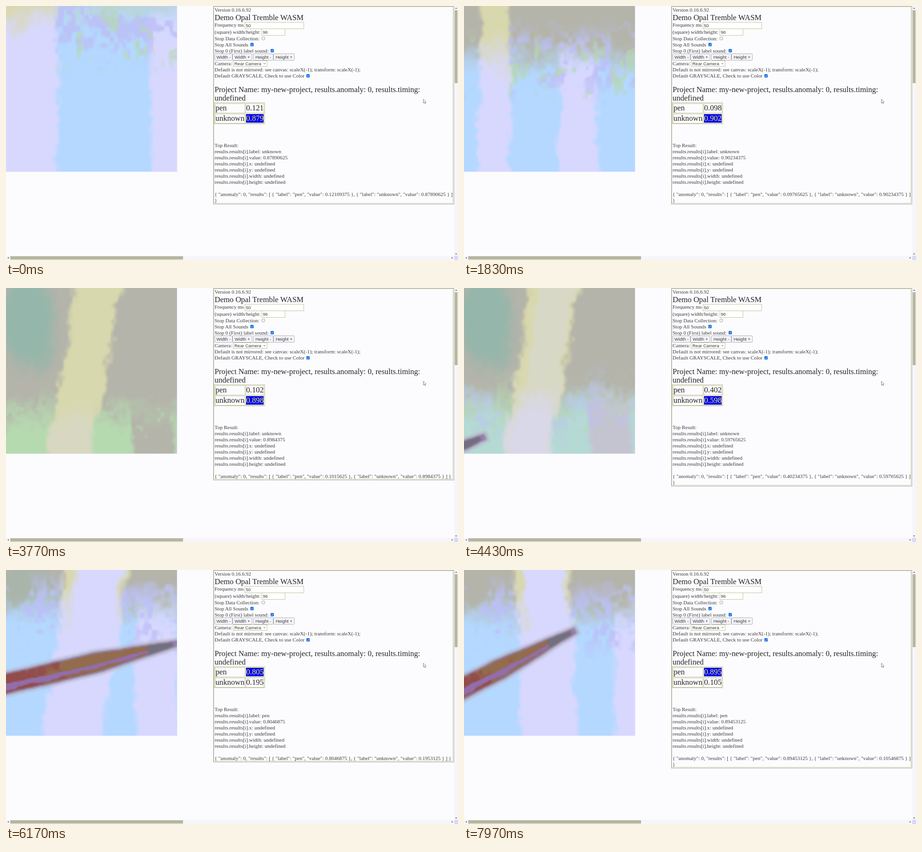
An HTML page with a canvas that plays this animation: 960x540 px, repeating every 8000 ms.

```html
<!DOCTYPE html>
<html lang="en">
<head>
<meta charset="utf-8">
<title>Classifier demo</title>
<style>
  html, body { margin: 0; width: 100%; height: 100%; overflow: hidden; background: #fcfcff; }
  canvas, svg { position: absolute; left: 0; top: 0; }
  canvas { width: 363px; height: 352px; box-shadow: 0 0 0 1px #ececff; }
  text { font-family: "Liberation Serif", "Times New Roman", serif; font-size: 11px; fill: #3c3c3c; white-space: pre; }
  .big { font-size: 16.5px; fill: #242424; }
  .ui { font-family: "Liberation Sans", Arial, sans-serif; font-size: 9.5px; }
  .top { fill: #f4f45c; }
</style>
</head>
<body>
<canvas id="camera" width="121" height="117"></canvas>
<svg id="page" width="960" height="540" viewBox="0 0 960 540"></svg>
<script>
const LOOP = 8000;
const lerp = (a, b, k) => a + (b - a) * k;
const mix = (a, b, k) => a.map((v, i) => lerp(v, b[i], k));
const smooth = (lo, hi, v) => {
  const k = Math.min(1, Math.max(0, (v - lo) / (hi - lo)));
  return k * k * (3 - 2 * k);
};
// Linear interpolation over [time, ...values] key poses.
function sample(keys, t) {
  const i = Math.max(0, keys.findLastIndex(k => k[0] <= t));
  const a = keys[i], b = keys[i + 1] || a;
  return mix(a, b, a === b ? 0 : Math.max(0, (t - a[0]) / (b[0] - a[0]))).slice(1);
}

// ---------- page ----------
const LEFT = 443, LINE = 13;
const OLIVE = '#c4c49c', GREY = '#b4b4b4';
const el = id => document.getElementById(id);
const label = (x, y, str, cls = '', id = '') => `<text x="${x}" y="${y}" class="${cls}" id="${id}">${str}</text>`;
const rect = (x, y, w, h, fill, stroke = 'none', extra = '') =>
  `<rect x="${x}" y="${y}" width="${w}" height="${h}" fill="${fill}" stroke="${stroke}" ${extra}/>`;
const path = (d, fill, stroke = 'none') => `<path d="${d}" fill="${fill}" stroke="${stroke}"/>`;
const lines = (y, rows) => rows.map((str, i) => label(LEFT, y + LINE * i, str)).join('');
const field = (x, y, w, str) => rect(x + .5, y + .5, w, 14, '#fff', OLIVE) + label(x + 2.5, y + 11, str, 'ui');
const checkbox = (x, y, on) => on
  ? rect(x, y, 7, 7, '#1470e4', 'none', 'rx="1"') + path(`M${x + 1.4} ${y + 3.6}l1.5 1.6l2.8 -3.2`, 'none', '#fff')
  : rect(x + .5, y + .5, 6, 6, '#fff', '#a0a0a0', 'rx="1"');
const button = (x, w, str) => rect(x + .5, 101.5, w - 1, 14, '#f4f4f8', '#b0b0bc', 'rx="1"') +
  `<text x="${x + w / 2}" y="112" text-anchor="middle" class="ui">${str}</text>`;

page.innerHTML =
  rect(440.5, .5, 511, 421, 'none', GREY, 'id="outer"') +
  rect(441.5, 1.5, 508, 418, 'none', OLIVE, 'id="inner"') +
  label(LEFT, 12, 'Version 0.16.6.92') +
  label(LEFT, 30, 'Demo Opal Tremble WASM', 'big') +
  label(LEFT, 44, 'Frequency ms') + field(507, 34, 125, '50') +
  label(LEFT, 58.5, '(square) width/height:') + field(543, 48, 49, '96') +
  lines(72.5, ['Stop Data Collection:', 'Stop All Sounds', 'Stop 0 (First) label sound:']) +
  [543, 519, 562].map((x, i) => checkbox(x, 65.5 + LINE * i, i > 0)).join('') +
  button(443, 38, 'Width -') + button(481, 42, 'Width +') + button(525, 43, 'Height -') + button(568, 45, 'Height +') +
  rect(482.5, 116.5, 72, 12, '#fff', OLIVE) + label(485, 126, 'Rear Camera', 'ui') +
  path('M547 121.5l2 2l2 -2', 'none', '#505050') +
  lines(126, ['Camera:', 'Default is not mirrored: see canvas: scaleX(-1); transform: scaleX(-1);',
    'Default GRAYSCALE, Check to use Color']) + checkbox(638, 145, true) +
  label(LEFT, 183, 'Project Name: my-new-project, results.anomaly: 0, results.timing:', 'big') +
  label(LEFT, 201, 'undefined', 'big') +
  rect(442.5, 205.5, 107, 45, 'none', OLIVE) +
  [207.5, 229.5].map(y => rect(444.5, y, 63, 20, 'none', OLIVE) + rect(509.5, y, 38, 20, 'none', OLIVE)).join('') +
  rect(510, 230, 37, 18, '#0000f0', 'none', 'id="mark"') +
  ['pen', 'unknown'].map((name, i) =>
    label(445, 222 + 22 * i, name, 'big') + label(510, 222 + 22 * i, '', 'big', name)).join('') +
  label(LEFT, 300, 'Top Result:') + label(LEFT, 313, '', '', 'name') + label(LEFT, 326, '', '', 'value') +
  lines(339, ['x', 'y', 'width', 'height'].map(key => `results.results[i].${key}: undefined`)) +
  label(LEFT, 404, '', '', 'json') + label(LEFT, 417, '}', '', 'brace') +
  // scrollbars
  rect(952, 0, 8, 531, '#f6f6fa') + rect(0, 531, 952, 9, '#f6f6fa') + rect(952, 531, 8, 9, '#d8d8ff') +
  rect(953, 9, 6, 155, '#b6b6a0') + rect(9, 532, 367, 7, '#b6b6a0') +
  path('M954 6l2 -3l2 3zM954 526l2 3l2 -3zM6 533.5l-3 2l3 2zM946.5 533.5l3 2l-3 2z', '#707070') +
  // pointer
  path('M886.5 198v8.5l2 -1.8l1.5 3l1.2 -.6l-1.4 -2.9h2.4z', '#fff', '#84848c');

// Pen score in 1/256 units.
const SCORE = [[0, 31], [1130, 26], [2570, 23], [3770, 26], [5170, 190], [6170, 206], [7970, 229]];

function drawPage(t) {
  const units = Math.round(sample(SCORE, t)[0]);
  const pen = units / 256, unknown = 1 - pen, penWins = pen > .5;
  const wraps = units % 2 === 1;
  el('pen').textContent = pen.toFixed(3);
  el('unknown').textContent = unknown.toFixed(3);
  el('pen').classList.toggle('top', penWins);
  el('unknown').classList.toggle('top', !penWins);
  el('mark').setAttribute('y', penWins ? 208 : 230);
  el('name').textContent = `results.results[i].label: ${penWins ? 'pen' : 'unknown'}`;
  el('value').textContent = `results.results[i].value: ${Math.max(pen, unknown)}`;
  el('json').textContent = `{ "anomaly": 0, "results": [ { "label": "pen", "value": ${pen} }, ` +
    `{ "label": "unknown", "value": ${unknown} } ]${wraps ? '' : ' }'}`;
  el('brace').setAttribute('visibility', wraps ? 'visible' : 'hidden');
  el('outer').setAttribute('height', wraps ? 421 : 408);
  el('inner').setAttribute('height', wraps ? 418 : 405);
}

// ---------- camera picture ----------
const GRAY = [180, 180, 170], BLUE = [180, 216, 255], LAVENDER = [216, 216, 255], YELLOW = [216, 216, 174];
const GREEN = [182, 218, 176], TEAL = [146, 182, 170], LILAC = [188, 190, 246], MIST = [186, 212, 224];
const RED = [146, 76, 74], BROWN = [146, 108, 76], VIOLET = [146, 110, 172];
const RIM = [146, 130, 176], HALO = [182, 180, 194], NIB = [112, 112, 126];

// time, horizon, light stripe: centre at top and bottom, half width
const SCENE = [
  [0, 30, 30, 30, 80], [1130, 150, 67, 70, 33], [2570, 65, 65, 58, 33], [3770, 270, 198, 132, 48],
  [5170, 200, 190, 130, 55], [6170, 80, 195, 140, 65], [7970, 90, 168, 180, 58]
];
// time, tip x, tip y, tilt
const PEN = [[4250, -60, 360, .38], [5170, 480, 131, .312], [6170, 366, 155, .231], [7970, 238, 127, .474]];
const PEN_HALF = 23;

const ctx = el('camera').getContext('2d');
const { width: W, height: H } = ctx.canvas;
const image = ctx.createImageData(W, H);

const hash = (x, y) => { const v = Math.sin(x * 127.1 + y * 311.7) * 43758.5453; return v - Math.floor(v); };
function valueNoise(x, y) {
  const i = Math.floor(x), j = Math.floor(y), u = smooth(0, 1, x - i), v = smooth(0, 1, y - j);
  return 2 * lerp(lerp(hash(i, j), hash(i + 1, j), u), lerp(hash(i, j + 1), hash(i + 1, j + 1), u), v) - 1;
}
const rough = (x, y) => .6 * valueNoise(x / 34, y / 40) + .4 * valueNoise(x / 9, y / 12);

// Fixed noise per pixel makes every border blotchy.
const points = Array.from({ length: W * H }, (_, i) => {
  const x = (i % W) * 3 + 1.5, y = Math.floor(i / W) * 3 + 1.5;
  const nx = rough(x, y), ny = rough(x + 900, y + 500);
  return { x, y, nx, ny, wx: x + 13 * nx, wy: y + 22 * ny };
});

const colour = [0, 0, 0];
const blend = (c, k) => { if (k > 0) for (let n = 0; n < 3; n++) colour[n] += (c[n] - colour[n]) * k; };
const stripe = (x, centre, half) => smooth(half + 8, half - 8, Math.abs(x - centre));

function drawBackground(t) {
  const [horizon, top, bottom, half] = sample(SCENE, t);
  const warm = smooth(2570, 3770, t) * (1 - smooth(3770, 5170, t));
  const glare = smooth(3770, 5600, t);
  const teal = smooth(2570, 3770, t) * (1 - smooth(5170, 6800, t));
  const sky = mix(MIST, GRAY, smooth(0, 900, t));
  const ground = mix(BLUE, GREEN, warm);
  const stripeLow = mix(LAVENDER, YELLOW, .75 * warm);
  const echoColour = mix(LAVENDER, GRAY, warm);
  const echo = bottom + lerp(320, 180, smooth(0, 1130, t));

  return p => {
    const low = smooth(horizon - 45, horizon + 45, p.wy + 25 * p.nx);
    const band = smooth(100, 20, Math.abs(p.wy - horizon - 15));
    const centre = lerp(top, bottom, p.y / 352);
    blend(sky, 1);
    blend(TEAL, .9 * teal * smooth(1.3, .6, Math.hypot((p.wx - 45) / 62, (p.wy - 70) / 105)));
    blend(ground, low);
    blend(echoColour, low * stripe(p.wx, echo, 42));
    blend(LILAC, .8 * band * (1 - warm) * smooth(.05, .4, p.nx));
    blend(GREEN, .7 * band * (1 - glare) * smooth(.15, .45, -p.ny));
    blend(mix(YELLOW, stripeLow, low), stripe(p.wx, centre, half));
    blend(LAVENDER, glare * stripe(p.wx, centre + 6, half * .75));
  };
}

function drawPen(t) {
  if (t < PEN[0][0]) return () => {};
  const [tipX, tipY, tilt] = sample(PEN, t);
  const cos = Math.cos(tilt), sin = Math.sin(tilt);

  return p => {
    const dx = p.x - tipX, dy = p.y - tipY;
    const along = -dx * cos + dy * sin, across = dx * sin + dy * cos + p.nx;
    const w = PEN_HALF * Math.min(1, .3 + Math.max(0, along) / 260), d = Math.abs(across), q = across / w;
    const core = smooth(w - 2, w - 6, d) * smooth(8, 18, along);
    blend(HALO, .8 * smooth(w + 9, w, d) * smooth(-10, 0, along));
    blend(RIM, smooth(w + 2, w - 3, d) * smooth(-3, 5, along));
    blend(mix(BROWN, RED, smooth(-.3, .4, p.nx + (along - 240) / 200)), core);
    blend(VIOLET, core * smooth(0, .15, q + .1 * p.nx) * smooth(.65, .45, q + .2 * p.ny));
    blend(NIB, core * smooth(70, 62, along));
  };
}

function drawCamera(t) {
  const layers = [drawBackground(t), drawPen(t)];
  points.forEach((p, i) => {
    layers.forEach(paint => paint(p));
    image.data.set([...colour, 255], i * 4);
  });
  ctx.putImageData(image, 0, 0);
}

function frame(now) {
  const t = now % LOOP;
  drawCamera(t);
  drawPage(t);
  requestAnimationFrame(frame);
}
frame(0);
</script>
</body>
</html>
```
